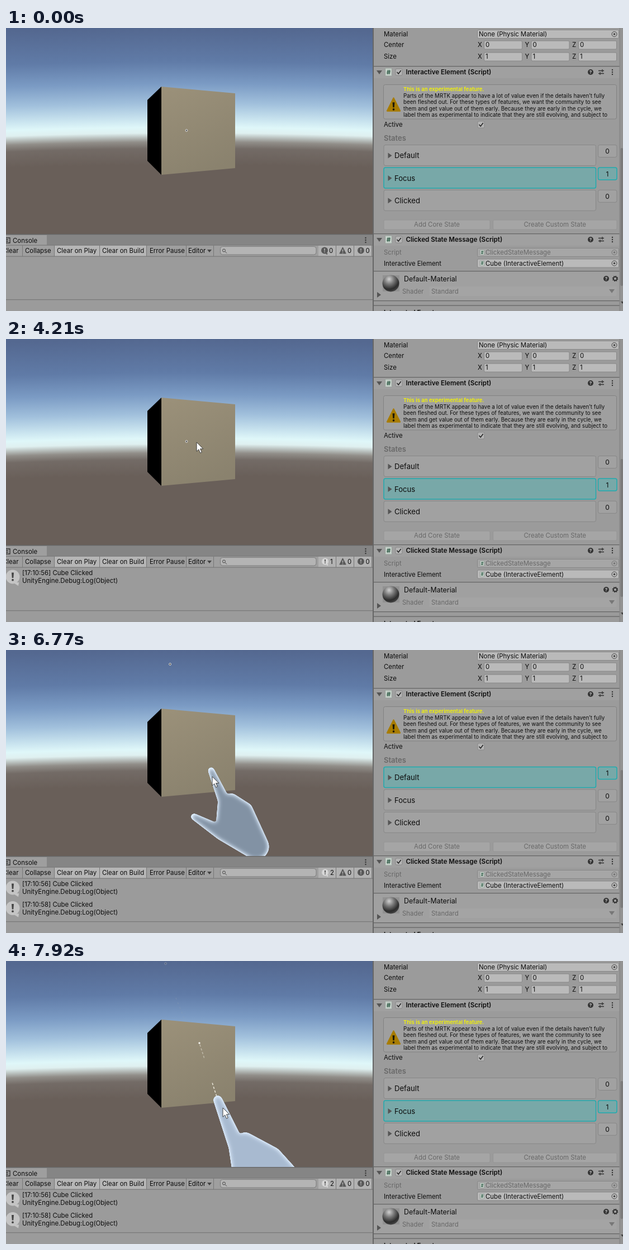
Animation, 1104 px wide and 507 px high, one loop 8 s. Source, as an HTML page:

```html
<!DOCTYPE html>
<html lang="en">
<head>
<meta charset="utf-8">
<title>Clicked state demo</title>
<style>
html, body { margin: 0; width: 100%; height: 100%; overflow: hidden; background: #9b9b9b; }
svg { display: block; width: 100vw; height: 100vh; }
text { font-family: Inter, Roboto, sans-serif; white-space: pre; }
.state rect { fill: #a1a1a1; stroke: #878787; }
.state.on rect { fill: #78a8a8; stroke: #1fabae; stroke-width: 1.5; }
</style>
</head>
<body>
<svg id="stage" viewBox="0 0 1104 507" preserveAspectRatio="none"></svg>
<script>
const LOOP = 8000, INK = '#0c0c0c', DIM = '#686868', LINE = '#666';

// ---------- drawing helpers ----------
const text = (x, y, s, { size = 11.4, fill = INK, weight = 400, anchor = 'start', id = '' } = {}) =>
  `<text ${id && `id="${id}"`} x="${x}" y="${y + size * .365}" font-size="${size}" fill="${fill}" font-weight="${weight}" text-anchor="${anchor}">${s}</text>`;
const rect = (x, y, w, h, fill, extra = '') => `<rect x="${x}" y="${y}" width="${w}" height="${h}" fill="${fill}" ${extra}/>`;
const path = (d, fill = 'none', extra = '') => `<path d="${d}" fill="${fill}" ${extra}/>`;
const circle = (x, y, r, fill, extra = '') => `<circle cx="${x}" cy="${y}" r="${r}" fill="${fill}" ${extra}/>`;
const field = (x, y, w, h = 15, fill = '#bababa') => rect(x + .5, y + .5, w - 1, h, fill, 'rx="2" stroke="#878787"');
const hline = (x, y, w, c = LINE) => rect(x, y, w, 1.3, c);
const dots = (x, y) => [-4, 0, 4].map(d => circle(x, y + d, 1.2, '#333')).join('');
const down = (x, y, c = '#555') => path(`M${x - 5} ${y - 3}h10l-5 7z`, c);
const right = (x, y, c = '#555') => path(`M${x - 3} ${y - 5}v10l7-5z`, c);
const check = (x, y) => field(x - 6.5, y - 6.5, 13, 12, '#b4b4b4') +
  path(`M${x - 3.5} ${y}l2.7 3 4.5-6`, 'none', 'stroke="#222" stroke-width="1.5"');
const target = (x, y) => circle(x, y, 4.5, 'none', 'stroke="#444"') + circle(x, y, 1.8, '#444');
const help = (x, y) => circle(x, y, 5, '#333') + text(x, y, '?', { size: 8, fill: '#ccc', weight: 700, anchor: 'middle' });
const sliders = (x, y) => path(`M${x - 5} ${y - 2.5}h10M${x + 2} ${y - 5}v5M${x - 5} ${y + 2.5}h10M${x - 2} ${y}v5`, 'none', 'stroke="#333" stroke-width="1.3"');
const gear = (x, y) => circle(x, y, 3.2, 'none', 'stroke="#333" stroke-width="2"') +
  circle(x, y, 4.6, 'none', 'stroke="#333" stroke-width="1.4" stroke-dasharray="1.8 1.8"');
const sheet = (x, y, s = 1) => rect(x - 6 * s, y - 7 * s, 12 * s, 14 * s, '#c3cec7', 'rx="1" stroke="#8b938e" stroke-width=".7"') +
  text(x, y, '#', { size: 11 * s, fill: '#2d5a45', weight: 700, anchor: 'middle' });
const bang = (x, y, r, ink) => path(`M${x - r * .16} ${y - r * .6}h${r * .32}l${-r * .06} ${r * .75}h${-r * .2}z`, ink) +
  circle(x, y + r * .45, r * .15, ink);
const bubble = (x, y, r, fill, ink) => circle(x, y, r, fill) +
  path(`M${x} ${y + r * .8}h${r * .9}l${-r * .1} ${r * .5}z`, fill) + bang(x, y, r, ink);
const warning = (x, y, r, fill, ink) =>
  path(`M${x} ${y - r}l${r} ${r * 2}h${-r * 2}z`, fill, `stroke="${fill}" stroke-width="${r * .2}" stroke-linejoin="round"`) +
  bang(x, y + r * .3, r * 1.05, ink);

// ---------- panels ----------
const header = (y, title) => rect(658, y, 440, 21, '#a0a0a0') + hline(658, y - 1, 440) + down(668, y + 10) +
  sheet(684.5, y + 10) + check(703, y + 10) + text(715.5, y + 10, title, { size: 11.6, weight: 600 }) +
  help(1046, y + 10) + sliders(1065, y + 10) + dots(1085, y + 10);

const axes = (y, v) => ['X', 'Y', 'Z'].map((a, i) => {
  const x = 844 + i * 84.5;
  return text(x, y, a) + field(x + 11, y - 7.5, 69) + text(x + 14, y, v);
}).join('');

const stateRow = (name, i) => {
  const y = 209.5 + i * 40.4;
  return `<g class="state" id="s${i}">` + rect(676, y, 379.5, 37, '', 'rx="3"') + rect(1059.5, y, 33.5, 22, '', 'rx="3"') +
    right(686.5, y + 19) + text(695, y + 19, name, { size: 13.1 }) +
    text(1076, y + 11.5, '0', { size: 12, anchor: 'middle', id: 'n' + i }) + '</g>';
};

const button = (x, w, s) => rect(x, 344, w, 17, '#a5a5a5', 'rx="2" stroke="#929292" stroke-width=".8"') +
  text(x + w / 2, 352, s, { fill: DIM, anchor: 'middle' });

function inspector() {
  const note = ['Parts of the MRTK appear to have a lot of value even if the details haven’t fully',
    'been fleshed out. For these types of features, we want the community to see',
    'them and get value out of them early. Because they are early in the cycle, we',
    'label them as experimental to indicate that they are still evolving, and subject to'];
  return rect(656, 0, 448, 507, '#9b9b9b') +
    text(676, 11, 'Material') + field(843, 3, 254) + text(846, 11, 'None (Physic Material)') + target(1088.5, 11) +
    text(676, 30, 'Center') + axes(30, '0') + text(676, 51, 'Size') + axes(51, '1') +
    header(69, 'Interactive Element (Script)') +
    rect(675.5, 101.5, 417, 61.5, '#9f9f9f', 'rx="3" stroke="#828282"') + warning(693.5, 137, 11.5, '#a87c00', '#1c1808') +
    text(711, 109.5, 'This is an experimental feature.', { size: 9.5, fill: '#f4f400', weight: 600 }) +
    note.map((s, i) => text(711, 121 + i * 11.5, s, { size: 9.75 })).join('') +
    text(676, 173, 'Active') + check(850, 173) +
    text(676, 197, 'States', { size: 13, fill: DIM, weight: 600 }) +
    ['Default', 'Focus', 'Clicked'].map(stateRow).join('') +
    button(676, 190, 'Add Core State') + button(871.5, 221.5, 'Create Custom State') +
    header(369, 'Clicked State Message (Script)') +
    text(676, 402, 'Script', { fill: DIM }) + field(843, 394, 254, 15, '#a6a6a6') + sheet(852, 402, .65) +
    text(858, 402, 'ClickedStateMessage', { fill: DIM }) + '<g opacity=".5">' + target(1088.5, 402) + '</g>' +
    text(676, 421.5, 'Interactive Element') + field(843, 413.5, 254) + sheet(852, 421.5, .65) +
    text(858, 421.5, 'Cube (InteractiveElement)') + target(1088.5, 421.5) +
    rect(658, 436, 440, 52, '#a0a0a0') + hline(658, 435, 440) +
    rect(674, 443, 30, 29, '#919191') + circle(688.5, 457.5, 15, 'url(#ball)') +
    text(712, 449.5, 'Default-Material', { size: 12.4 }) + help(1074, 449) + gear(1090, 449) +
    text(709, 471.5, 'Shader', { fill: DIM }) + rect(757.5, 463, 335, 17, '#a4a4a4', 'rx="2"') +
    text(761, 471.5, 'Standard', { fill: DIM }) + down(1084, 471, '#777') + right(667, 478) +
    hline(658, 488, 440) + hline(658, 496.5, 440) +
    text(676, 509.5, 'Integrated Events', { weight: 600 }) +
    rect(1098, 0, 6, 507, '#939393') + rect(1097.5, 0, 1, 507, '#828282') +
    rect(1099.5, 215, 4.5, 247, '#7b7b7b', 'rx="2"') + path('M1100 490h6l-3 4z', '#444') +
    rect(656, 0, 2, 507, '#666');
}

const message = (id, y, time) => `<g id="${id}">` + bubble(12, y + 7, 12.5, '#c4c4c4', '#444') +
  text(29, y, `[${time}] Cube Clicked`) + text(29, y + 14, 'UnityEngine.Debug:Log(Object)') + '</g>';

function consolePane() {
  const tools = [['Clear', -6, 29], ['Collapse', 34, 86], ['Clear on Play', 91, 167], ['Clear on Build', 172, 251],
    ['Error Pause', 257, 322], ['Editor', 326, 371]];
  const tool = ([s, x, end]) => (s.startsWith('Clear on') ? rect(x - 4, 389, end - x + 4, 20, '#b6b6b6') : '') +
    rect(end, 389, 1, 20, '#777') + text(x, 399, s);
  return rect(0, 369, 656, 138, '#9b9b9b') + rect(0, 370, 656, 19, '#858585') + hline(0, 369, 656) +
    rect(0, 371, 73, 18, '#9e9e9e') +
    path('M0 376h7v9H0M0 379h4M0 382h4', 'none', 'stroke="#333" stroke-width="1.4"') + text(12, 381, 'Console') + dots(643.5, 380) +
    rect(0, 389, 656, 20, '#9f9f9f') + tools.map(tool).join('') +
    [559, 591, 623].map(x => rect(x, 389, 31, 20, '#b2b2b2') + rect(x + 31, 389, 1, 20, '#777')).join('') +
    hline(0, 388.5, 656, '#7d7d7d') + hline(0, 408.5, 656, '#7d7d7d') + path('M360 397h8l-4 5z', '#444') +
    rect(383.5, 391.5, 171.5, 14.5, '#b4b4b4', 'id="search" rx="4" stroke="#7d7d7d"') +
    circle(390, 398.5, 2.5, 'none', 'stroke="#444"') + path('M392 400.5l3 3', 'none', 'stroke="#444"') +
    '<g id="idle">' + bubble(570, 398.5, 6, '#585858', '#b2b2b2') + '</g>' +
    '<g id="busy">' + bubble(571, 398.5, 6, '#d5d5d5', '#444') + '</g>' + text(578, 399, '0', { id: 'count' }) +
    warning(602.5, 398.5, 5.5, '#585858', '#b2b2b2') + text(611, 399, '0') +
    circle(635, 398.5, 6, '#585858') + bang(635, 398.5, 6, '#b2b2b2') + text(643.5, 399, '0') +
    message('m1', 419, '17:10:56') + message('m2', 455.5, '17:10:58') + hline(0, 486, 656, '#7a7a7a');
}

const stops = list => list.map(([o, c]) => `<stop offset="${o}" stop-color="${c}"/>`).join('');
// The horizon bends slightly, so the sky is a thin ring of a huge circle.
const sky = [[0, '#546890'], [60, '#607ba7'], [100, '#7b9bc4'], [135, '#a1c0dc'], [178, '#dff7f9'],
  [188, '#dff0f0'], [204, '#918e89'], [216, '#736b66'], [245, '#695f59']].reverse().map(([y, c]) => [1 - y / 400, c]);

// The hand: joints are merged softly, then lit along the inside of the edge.
const defs = `<defs>
<radialGradient id="sky" gradientUnits="userSpaceOnUse" cx="328" cy="9200" r="9200" fr="8800">${stops(sky)}</radialGradient>
<linearGradient id="face" x1=".2" y1="0" x2=".5" y2="1">${stops([[0, '#9a9079'], [1, '#8a826e']])}</linearGradient>
<radialGradient id="ball" cx=".4" cy=".25" r=".75">${stops([[0, '#d0d0d0'], [.4, '#777'], [.8, '#2c2c2c'], [1, '#444']])}</radialGradient>
<filter id="rim" filterUnits="userSpaceOnUse" x="250" y="150" width="350" height="320" color-interpolation-filters="sRGB">
<feGaussianBlur stdDeviation="2.2"/><feColorMatrix values="1 0 0 0 0 0 1 0 0 0 0 0 1 0 0 0 0 0 10 -4.5" result="skin"/>
<feGaussianBlur in="skin" stdDeviation="4.5" result="blur"/>
<feFlood flood-color="#dcebfb"/><feComposite in2="skin" operator="in"/><feComposite in2="blur" operator="out"/>
<feColorMatrix values="1 0 0 0 0 0 1 0 0 0 0 0 1 0 0 0 0 0 1.9 0" result="glow"/>
<feMerge><feMergeNode in="skin"/><feMergeNode in="glow"/></feMerge></filter>
<clipPath id="view"><rect width="656" height="369"/></clipPath>
<clipPath id="around"><path clip-rule="evenodd" d="M0 0H656V369H0zM253 129L278 105L410 117V251L278 263L253 238z"/></clipPath>
</defs>`;

const scene = '<g clip-path="url(#view)">' + rect(0, 0, 656, 369, 'url(#sky)') +
  path('M253 129L278 105V263L253 238z', '#000') + path('M278 105L410 117V251L278 263z', 'url(#face)') +
  `<g id="ray" stroke="#e6e3d6" stroke-width="1.6" stroke-dasharray="4 3"><line id="near"/><line id="far" opacity=".5"/></g>
  <circle id="hit" r="1.7" fill="#f4f4ee"/>
  <path id="trace" d="M304 66L320 106" stroke="#98a2ac" stroke-dasharray="3 6" opacity=".4"/>
  <g id="gaze"><circle r="1.9" fill="#555" stroke="#e8e8e8"/></g>
  <g id="arm"><path id="hand" filter="url(#rim)"/></g></g>`;

const $ = id => document.getElementById(id);
$('stage').innerHTML = defs + scene + consolePane() + inspector() +
  path('M0 0V16.3L3.8 12.8L6.5 19.2L9.2 18L6.5 11.8H11.8z', '#fff', 'id="mouse" stroke="#333" stroke-width=".9"');

// ---------- motion ----------
const mix = (a, b, f) => a.map((v, i) => v + (b[i] - v) * f);
const ramp = (t, a, b) => Math.max(0, Math.min(1, (t - a) / (b - a)));
// Each move: start, end, then the place reached.
const track = (from, ...moves) => t => moves.reduce((p, [a, b, ...to]) => mix(p, to, ramp(t, a, b)), from);

const mouseAt = track([1098, 503], [360, 530, 1090, 497], [760, 1300, 308, 157], [1300, 1470, 332, 175],
  [1600, 1790, 334, 186], [2050, 2230, 322, 176], [2600, 2710, 334, 178], [4130, 4210, 341, 185], [4210, 4480, 358, 180],
  [5830, 5910, 361, 189], [5980, 6240, 361, 206], [6460, 7000, 375, 242], [7000, 7920, 388, 263]);
const gazeAt = track([323, 183.5], [6160, 6460, 310.5, 69], [6460, 6920, 285.5, 4.5]);
const hitAt = track([352, 182], [7390, 7920, 346, 147]);

// Joints of the hand: fingertip, index, middle and outer knuckle, wrist, thumb root, thumb tip.
const radii = [7, 13, 14, 15, 28, 16, 7];
const behind = { size: .6, tone: [112, 126, 143], at: [[366, 190], [375, 230], [388, 238], [403, 250], [421, 305], [373, 280], [340, 259]] };
const point = { size: 1, tone: [143, 160, 180], at: [[368, 235], [401, 299], [415, 291], [448, 312], [467, 387], [398, 364], [334, 328]] };
const reach = { size: 1.15, tone: [168, 186, 208], at: [[379, 249], [413, 332], [428, 323], [476, 350], [503, 402], [425, 388], [425, 402]] };
const blend = (a, b, f) => ({
  size: mix([a.size], [b.size], f)[0],
  tone: mix(a.tone, b.tone, f),
  at: a.at.map((p, i) => mix(p, b.at[i], f)),
});

// Convex outline round a set of circles.
function hull(circles) {
  const pts = circles.flatMap(([x, y, r]) => Array.from({ length: 28 }, (_, i) =>
    [x + r * Math.cos(i * Math.PI / 14), y + r * Math.sin(i * Math.PI / 14)])).sort((a, b) => a[0] - b[0] || a[1] - b[1]);
  const cross = (o, a, b) => (a[0] - o[0]) * (b[1] - o[1]) - (a[1] - o[1]) * (b[0] - o[0]);
  const half = list => list.reduce((h, p) => {
    while (h.length > 1 && cross(h.at(-2), h.at(-1), p) <= 0) h.pop();
    return [...h, p];
  }, []);
  return 'M' + [...half(pts), ...half(pts.reverse())].join('L') + 'z';
}

const show = (id, on) => { $(id).style.display = on ? '' : 'none'; };
const set = (id, attrs) => Object.entries(attrs).forEach(a => $(id).setAttribute(...a));
const move = (id, p) => set(id, { transform: `translate(${p})` });
const line = (id, a, b) => set(id, { x1: a[0], y1: a[1], x2: b[0], y2: b[1] });

function drawHand(t) {
  const pose = blend(blend(behind, point, ramp(t, 6460, 7000)), reach, ramp(t, 7000, 7920));
  const [tip, index, middle, outer, wrist, root, thumb] = pose.at.map((p, i) => [...p, radii[i] * pose.size]);
  set('hand', {
    d: hull([tip, index]) + hull([thumb, root]) + hull([index, middle, outer, wrist, root]),
    fill: `rgb(${pose.tone.map(Math.round)})`,
  });
  set('arm', { 'clip-path': t < 6640 ? 'url(#around)' : 'none' });
  return pose.at[0];
}

function draw(now) {
  const t = now % LOOP;
  show('mouse', t >= 360);
  move('mouse', mouseAt(t));
  move('gaze', gazeAt(t));
  set('gaze', { opacity: t < 6850 ? 1 : .3 });
  show('trace', t >= 6850);

  const count = (t >= 2630) + (t >= 5130);
  show('m1', count > 0);
  show('m2', count > 1);
  show('idle', !count);
  show('busy', count);
  $('count').textContent = count;
  set('count', { x: count ? 580 : 578 });

  const active = t >= 6240 && t < 7390 ? 0 : 1;
  for (let i = 0; i < 3; i++) {
    $('s' + i).classList.toggle('on', i === active);
    $('n' + i).textContent = +(i === active);
  }

  show('arm', t >= 6240);
  const tip = drawHand(t), hit = hitAt(t);
  show('ray', t >= 7390);
  show('hit', t >= 7390);
  move('hit', hit);
  line('near', tip, mix(tip, hit, .3));
  line('far', mix(tip, hit, .74), hit);
}

let start;
function tick() {
  const now = performance.now();
  start ??= now;
  draw(now - start);
  requestAnimationFrame(tick);
}
tick();
</script>
</body>
</html>
```
